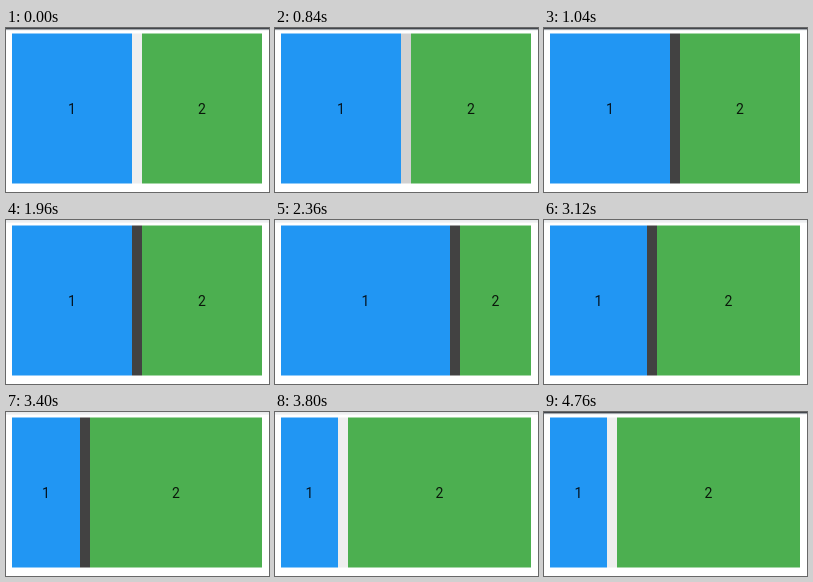
Recreate the animation shown at these times as an HTML page. Size 263 px wide and 164 px high, loop 4800 ms.

```html
<!DOCTYPE html>
<html lang="en">
<head>
<meta charset="utf-8">
<title>Split view</title>
<style>
html, body { margin: 0; width: 100%; height: 100%; overflow: hidden; background: #fff; }
svg { display: block; width: 100vw; height: 100vh; }
text { font: 14px Roboto, sans-serif; text-anchor: middle; fill: #000; fill-opacity: .87; }
</style>
</head>
<body>
<svg viewBox="0 0 263 164">
  <rect width="263" height="164" fill="#fff"/>
  <rect y="2" width="263" height="1" fill="#f3f4f5"/>
  <rect id="edge" width="263" height="1"/>
  <rect id="edgeSoft" y="1" width="263" height="1"/>
  <rect id="left" x="6" y="5.5" height="150" fill="#2196f3"/>
  <rect id="divider" y="5.5" width="10" height="150"/>
  <rect id="right" y="5.5" height="150" fill="#4caf50"/>
  <text id="one" y="86">1</text>
  <text id="two" y="86">2</text>
</svg>
<script>
const LOOP = 4800, STEP = 40;
const LEFT = 6, RIGHT = 256, GAP = 10;
const el = id => document.getElementById(id);
const [edge, edgeSoft, left, divider, right, one, two] =
  ['edge', 'edgeSoft', 'left', 'divider', 'right', 'one', 'two'].map(el);

const set = (node, attrs) => {
  for (const key in attrs) node.setAttribute(key, attrs[key]);
};
const progress = (t, from, to) => Math.min(1, Math.max(0, (t - from) / (to - from)));

const easeOut = p => 1 - Math.pow(1 - p, 1.475);
const easeSoft = p => (p + p * p * (3 - 2 * p)) / 2;
const easeIn = p => Math.pow(p, 1.83);

// Divider drags: start, end, distance, easing
const drags = [
  [2080, 2600, 72, easeOut],
  [2680, 3240, -114, easeSoft],
  [3240, 3480, -21, easeIn]
];

function dividerX(t) {
  const x = drags.reduce((sum, [from, to, dist, ease]) =>
    sum + dist * ease(progress(t, from, to)), 126);
  return Math.round(x);
}

function dividerColor(t) {
  const dark = progress(t, 800, 1040) - progress(t, 3600, 3800);
  const v = Math.round(238 + (66 - 238) * dark);
  return `rgb(${v},${v},${v})`;
}

function render(time) {
  const t = Math.floor((time % LOOP) / STEP) * STEP;
  const x = dividerX(t), end = x + GAP;
  const inactive = t >= 1960 && t < 4760;
  set(edge, { fill: inactive ? '#e9ebed' : '#43474d' });
  set(edgeSoft, { fill: inactive ? '#eeeff1' : '#a4a8ad' });
  set(left, { width: x - LEFT });
  set(divider, { x, fill: dividerColor(t) });
  set(right, { x: end, width: RIGHT - end });
  set(one, { x: (LEFT + x) / 2 });
  set(two, { x: (end + RIGHT) / 2 });
}

const start = performance.now();
function tick() {
  render(performance.now() - start);
  requestAnimationFrame(tick);
}
tick();
</script>
</body>
</html>
```
